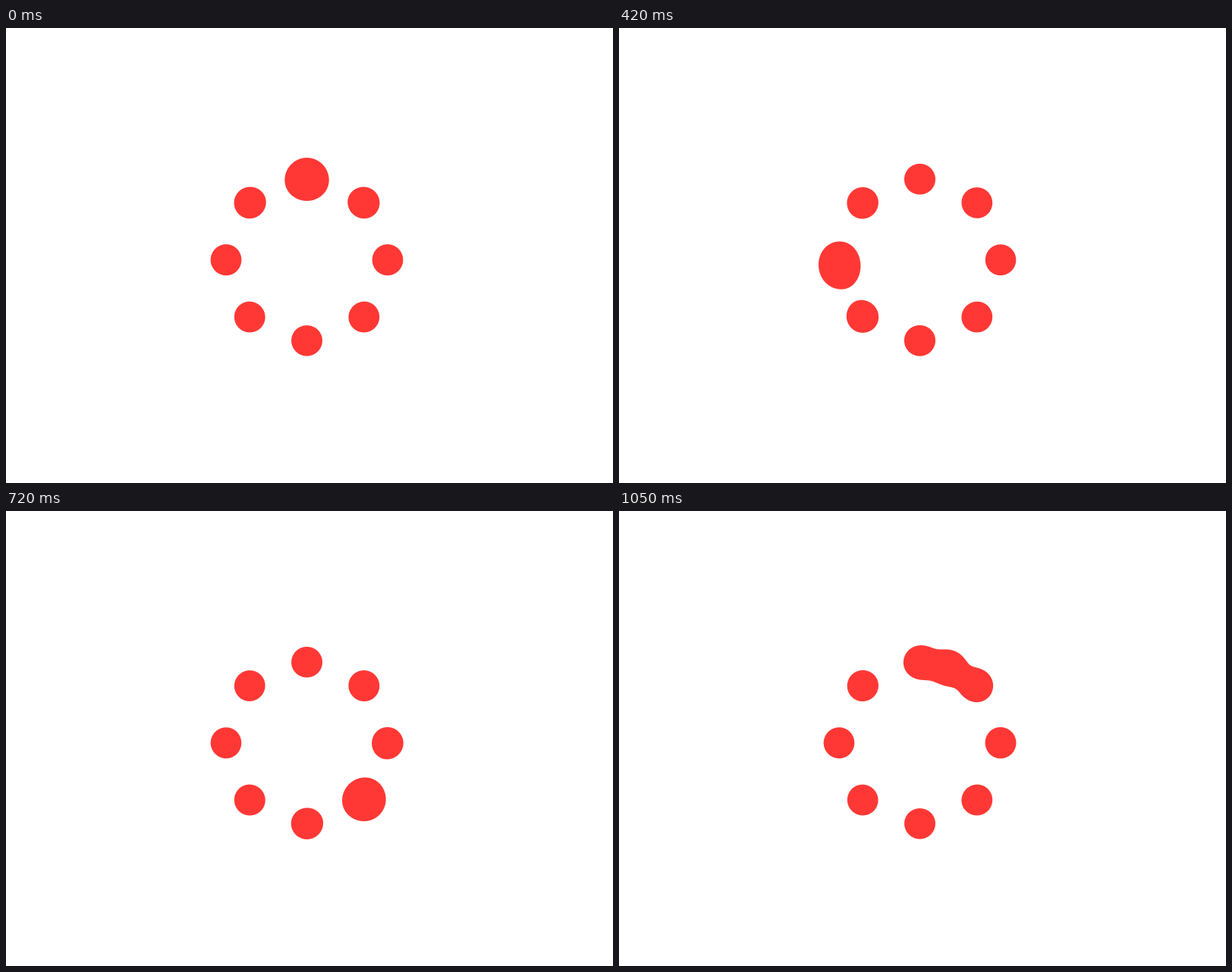
Write an HTML page with a canvas that moves like this. It is 800 by 600 pixels and loops after 1080 ms.

```html
<!DOCTYPE html>
<html lang="en">
<head>
<meta charset="utf-8">
<title>Metaball loader</title>
<style>
  html, body { margin: 0; width: 100%; height: 100%; overflow: hidden; background: #fff; }
  canvas { display: block; }
</style>
</head>
<body>
<canvas id="stage" width="800" height="600"></canvas>
<script>
  const LOOP = 1080, STEP = 30;
  const TURN = 1230;            // time a full eased turn would take; the loop cuts it short
  const CX = 396.5, CY = 305.8, RING = 106.9;
  const STRENGTH = 342;         // each ball adds STRENGTH / distance² to the field
  const COLOR = [255, 56, 53];
  const BOX = { x: 250, y: 160, w: 294, h: 292 };

  const ctx = document.getElementById('stage').getContext('2d');
  const image = ctx.createImageData(BOX.w, BOX.h);
  const pixels = image.data;
  for (let i = 0; i < pixels.length; i += 4) pixels.set(COLOR, i);

  // Angle in turns, counter-clockwise from the top.
  function ballAt(turns) {
    const a = turns * 2 * Math.PI;
    return { x: CX - RING * Math.sin(a), y: CY - RING * Math.cos(a) };
  }

  const balls = Array.from({ length: 8 }, (_, i) => ballAt(i / 8));

  const smooth = p => p * p * (3 - 2 * p);

  // Coverage of one pixel by the region where the field exceeds 1.
  function coverage(px, py, all) {
    let field = 0, gx = 0, gy = 0;
    for (const ball of all) {
      const dx = px - ball.x, dy = py - ball.y;
      const d2 = dx * dx + dy * dy + 1e-6;
      const f = STRENGTH / d2;
      field += f;
      gx += 2 * f * dx / d2;
      gy += 2 * f * dy / d2;
    }
    if (field > 1.5) return 1;
    if (field < 0.7) return 0;
    const slope = Math.max(Math.hypot(gx, gy), 1e-4);
    return Math.min(1, Math.max(0, 0.5 + (field - 1) / slope));
  }

  function draw(time) {
    const all = [...balls, ballAt(smooth(time / TURN))];
    let i = 3;
    for (let y = 0; y < BOX.h; y++) {
      for (let x = 0; x < BOX.w; x++, i += 4) {
        pixels[i] = 255 * coverage(BOX.x + x + 0.5, BOX.y + y + 0.5, all);
      }
    }
    ctx.putImageData(image, BOX.x, BOX.y);
  }

  const start = performance.now();
  let shown = -1;

  function tick() {
    const elapsed = Math.max(0, performance.now() - start) % LOOP;
    const time = Math.floor(elapsed / STEP) * STEP;
    if (time !== shown) draw(shown = time);
    requestAnimationFrame(tick);
  }
  tick();
</script>
</body>
</html>
```
